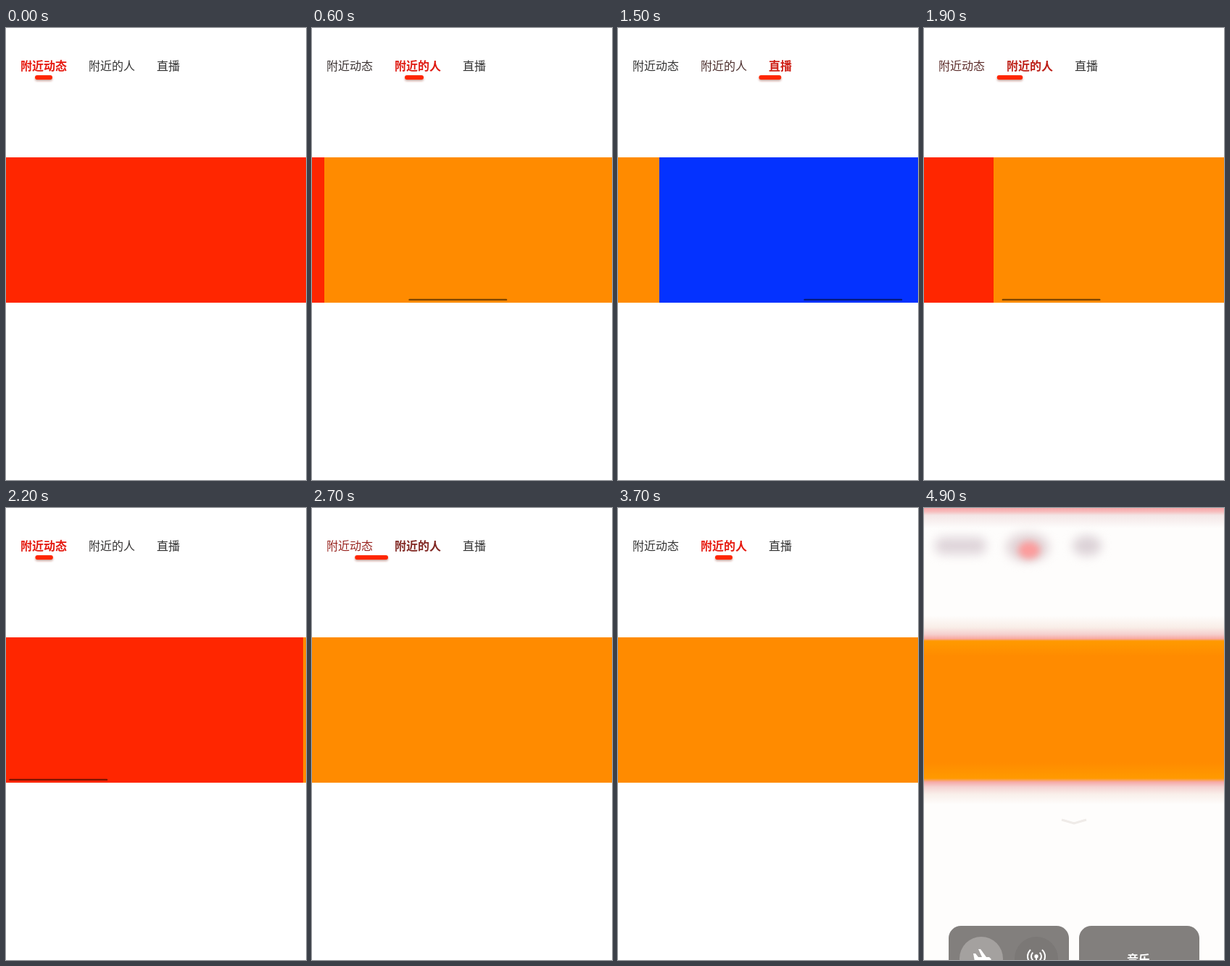
Animation, 414 px wide and 622 px high, one loop 5000 ms. Source, as an HTML page with a canvas:

```html
<!DOCTYPE html>
<html lang="zh">
<head>
<meta charset="utf-8">
<style>
html, body { margin: 0; width: 100%; height: 100%; overflow: hidden; background: #fff; }
canvas { display: block; }
</style>
</head>
<body>
<canvas id="stage" width="414" height="622"></canvas>
<script>
const W = 414, H = 622, LOOP = 5000, STEP = 100;
const ctx = document.getElementById('stage').getContext('2d');
const FONT = '16px "Noto Sans CJK SC", "Noto Sans CJK", sans-serif';
const PAGES = ['#ff2600', '#ff8b00', '#0432ff'];
const TABS = [
  { text: '附近动态', x: 20, mid: 52 },
  { text: '附近的人', x: 114, mid: 146 },
  { text: '直播', x: 208, mid: 224 }
];
const MOVES = [
  { start: 60, span: 740, from: 0, to: 1 },
  { start: 869, span: 480, from: 1, to: 2 },
  { start: 1446, span: 354, from: 2, to: 1 },
  { start: 1800, span: 480, from: 1, to: 0 },
  { start: 2604, span: 220, from: 0, to: 1, tap: true },
  { start: 2990, span: 220, from: 1, to: 2, tap: true },
  { start: 3450, span: 220, from: 2, to: 1, tap: true }
];

const clamp = v => Math.max(0, Math.min(1, v));
const mix = (a, b, k) => a + (b - a) * k;

function swipeEase(u) {
  const w = 1 - (1 - u) ** 1.6;
  return w * w * (3 - 2 * w);
}

function stateAt(t) {
  const move = MOVES.filter(m => t >= m.start).pop();
  if (!move) return { pos: 0, page: 0, bold: 0, bar: 0 };
  const u = clamp((t - move.start) / move.span);
  const pos = mix(move.from, move.to, move.tap ? u : swipeEase(u));
  if (move.tap) return { pos, page: move.to, bold: move.to, bar: 0 };
  const bar = clamp(1 - (t - move.start - move.span) / 120);
  return { pos, page: pos, bold: Math.round(pos), bar };
}

function pill(x, y, w, h, r, color) {
  ctx.fillStyle = color;
  ctx.beginPath();
  ctx.roundRect(x, y, w, h, r);
  ctx.fill();
}

function oval(x, y, rx, ry, color) {
  ctx.fillStyle = color;
  ctx.beginPath();
  ctx.ellipse(x, y, rx, ry, 0, 0, 7);
  ctx.fill();
}

function label(text, x, y, color, bold) {
  ctx.font = (bold ? '600 ' : '400 ') + FONT;
  ctx.fillStyle = color;
  ctx.fillText(text, x, y);
}

function drawTabs({ pos, bold }) {
  TABS.forEach((tab, i) => {
    const k = clamp(1 - Math.abs(pos - i));
    const color = `rgb(${mix(51, 230, k)}, ${mix(51, 25, k)}, ${mix(51, 15, k)})`;
    label(tab.text, tab.x, 58, color, i === bold);
  });
  // The underline stretches to the left halfway between two tabs.
  const i = Math.min(1, Math.floor(pos)), k = pos - i;
  const right = mix(TABS[i].mid, TABS[i + 1].mid, k) + 12;
  const width = 24 + 50 * Math.min(k, 1 - k);
  ctx.save();
  ctx.shadowColor = 'rgba(130, 25, 5, .4)';
  ctx.shadowOffsetY = 2;
  ctx.shadowBlur = 3;
  pill(right - width, 65, width, 6, 3, '#ff2600');
  ctx.restore();
}

function drawPager({ page, bar }) {
  PAGES.forEach((color, i) => {
    ctx.fillStyle = color;
    ctx.fillRect(Math.round((i - page) * W), 178, W, 200);
  });
  if (bar > 0) pill(3 + page * 136, 372.7, 136, 2.4, 1.2, `rgba(0, 0, 0, ${0.5 * bar})`);
}

function gradient(y0, y1, stops) {
  const g = ctx.createLinearGradient(0, y0, 0, y1);
  stops.forEach(([y, color]) => g.addColorStop((y - y0) / (y1 - y0), color));
  ctx.fillStyle = g;
  ctx.fillRect(0, y0, W, y1 - y0);
}

function drawPlane() {
  ctx.fillStyle = '#fff';
  ctx.beginPath();
  [[68, 613], [71, 613], [75, 618], [80, 618], [75, 607], [78, 607], [86, 618],
   [90, 618], [93, 621], [90, 624], [70, 624]].forEach(p => ctx.lineTo(...p));
  ctx.fill();
}

function drawAntenna() {
  ctx.strokeStyle = '#fff';
  ctx.lineWidth = 2;
  for (const r of [7, 12])
    for (const a of [0, Math.PI]) {
      ctx.beginPath();
      ctx.arc(155, 617, r, a - 0.85, a + 0.85);
      ctx.stroke();
    }
  oval(155, 617, 2.7, 2.7, '#fff');
  ctx.fillRect(154, 617, 2, 9);
}

function drawPanel() {
  const paper = '#fefdfc';
  ctx.fillStyle = paper;
  ctx.fillRect(0, 0, W, H);
  gradient(0, 28, [[0, '#f9a6a8'], [5, '#f6bdbd'], [10, '#f3e6e6'], [28, paper]]);
  gradient(148, 408, [[148, paper], [164, '#f9eee8'], [174, '#f5cfcd'], [180, '#f8a8a0'],
    [183, '#ff9a00'], [204, '#ff8b00'], [350, '#ff8b00'], [372, '#ff9a00'],
    [377, '#f6a9a8'], [384, '#f4d3d2'], [394, '#f9efea'], [408, paper]]);

  ctx.save();
  ctx.filter = 'blur(7px)';
  pill(15, 40, 71, 24, 12, '#dfd5da');
  oval(143, 54, 30, 20, '#e2d5d8');
  oval(225, 52, 20, 14, '#dcd2d7');
  ctx.filter = 'blur(5px)';
  oval(145, 58, 15, 12, '#fb9c9c');
  ctx.restore();

  ctx.strokeStyle = '#efebe8';
  ctx.lineWidth = 3;
  ctx.beginPath();
  ctx.moveTo(190, 429);
  ctx.lineTo(207, 434);
  ctx.lineTo(224, 429);
  ctx.stroke();

  pill(34, 575, 166, 166, 17, '#827f7d');
  pill(214, 575, 166, 166, 17, '#827f7d');
  oval(79, 620, 30, 30, '#a4a19f');
  oval(155, 620, 30, 30, '#7b7876');
  drawPlane();
  drawAntenna();
  label('音乐', 280, 627, '#fff', true);
}

function draw(t) {
  if (t >= 4900) return drawPanel();
  ctx.fillStyle = '#fff';
  ctx.fillRect(0, 0, W, H);
  const state = stateAt(t);
  drawPager(state);
  drawTabs(state);
}

const begin = performance.now();
function tick() {
  const t = (performance.now() - begin) % LOOP;
  draw(Math.floor(t / STEP) * STEP);
  requestAnimationFrame(tick);
}
tick();
</script>
</body>
</html>
```
